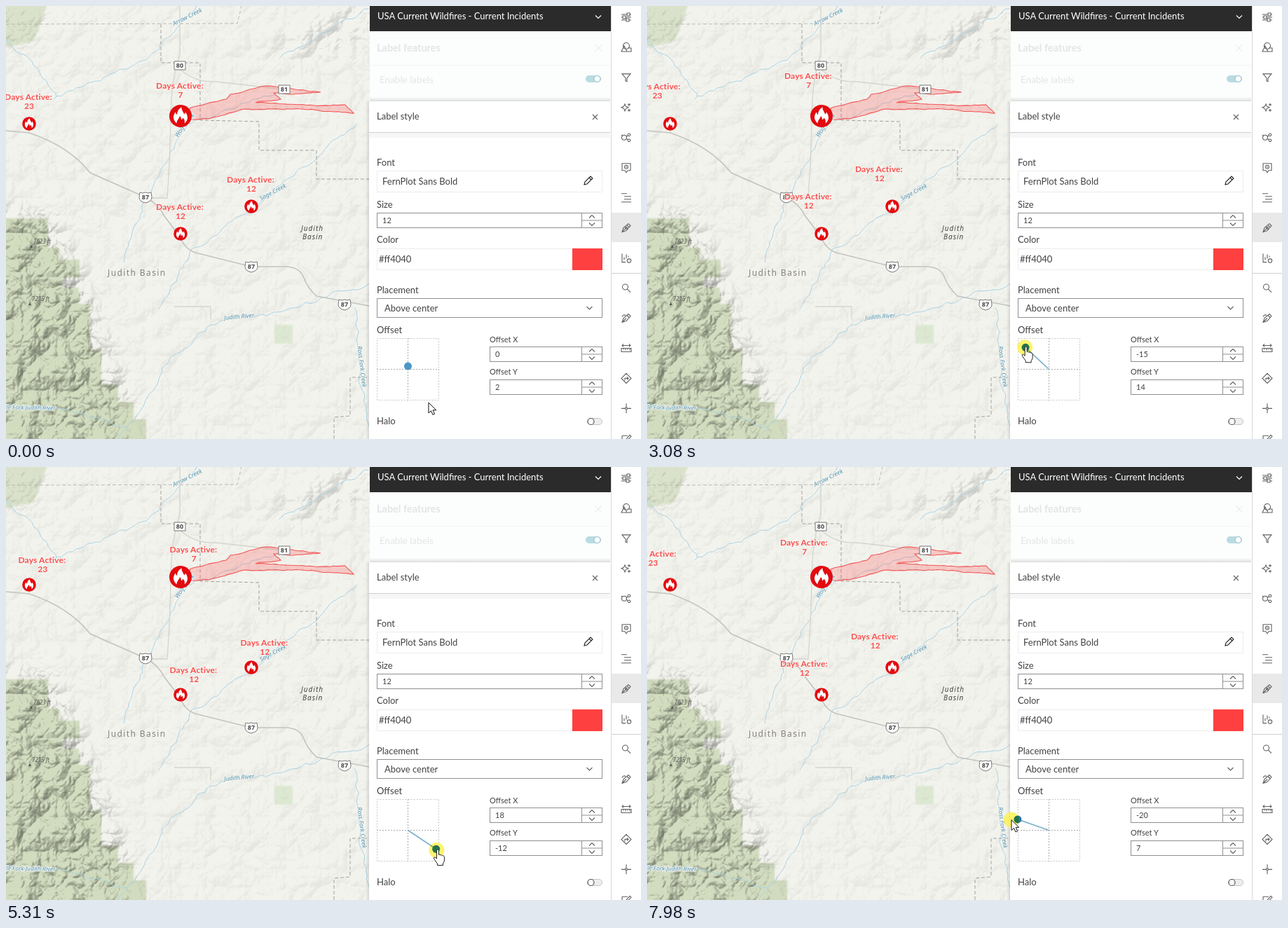
Write an HTML page that moves like this. It is 906x618 px and loops after 8000 ms.

```html
<!DOCTYPE html>
<html lang="en">
<head>
<meta charset="utf-8">
<title>Label offset</title>
<style>
html, body { margin: 0; width: 100%; height: 100%; overflow: hidden; background: #fff; }
svg { position: absolute; left: 0; top: 0; width: 906px; height: 618px; display: block; }
#map { will-change: transform; }
.ui text { font: 13px Lato, sans-serif; fill: #424242; }
.ui .small { font-size: 11px; }
.ui .head { fill: #fff; }
.ui .dim { fill: #e3e6e6; font-size: 13.5px; }
.ui .bold { font-weight: bold; font-size: 14.5px; }
.place { font-family: "Noto Sans", sans-serif; }
.water { font: italic 8.5px "Noto Sans", sans-serif; fill: #4f94b3; text-anchor: middle; stroke: #f3f3ee; stroke-width: 2px; paint-order: stroke; }
.road { font: bold 9px "Noto Sans", sans-serif; fill: #444; text-anchor: middle; }
.days text { font: bold 12px Lato, sans-serif; letter-spacing: .15px; fill: #f9504f; text-anchor: middle; stroke: #f6f3ee; stroke-width: 1.5px; paint-order: stroke; }
.line, .icons { fill: none; stroke: #606060; stroke-width: 1.1; }
.box { fill: #fff; stroke: #8f8f8f; }
.pale { fill: #fff; stroke: #ececec; }
</style>
</head>
<body>
<svg id="map" viewBox="0 0 906 618">
  <defs>
    <filter id="relief" x="0" y="0" width="100%" height="100%" color-interpolation-filters="sRGB">
      <feTurbulence type="turbulence" baseFrequency=".02" numOctaves="4" seed="8"/>
      <feDiffuseLighting surfaceScale="14" diffuseConstant="1.2" lighting-color="#fff">
        <feDistantLight azimuth="225" elevation="58"/>
      </feDiffuseLighting>
    </filter>
    <filter id="soft"><feGaussianBlur stdDeviation="14"/></filter>
    <filter id="edge"><feGaussianBlur stdDeviation="1.2"/></filter>
    <mask id="hills">
      <rect width="520" height="618" fill="#0d0d0d"/>
      <path d="M-40 290L60 300 110 400 160 540 185 640H-40Z" fill="#6c6c6c" filter="url(#soft)"/>
      <path d="M-30-30H70L30 50-30 70ZM370 60L520-20V50L430 80Z" fill="#2c2c2c" filter="url(#soft)"/>
    </mask>
  </defs>
  <rect width="520" height="618" fill="#f3f3ee"/>
  <g fill="#d2dcbf" filter="url(#edge)">
    <path d="M-5 303H60V345H76V362H105V388H80V402H104V425H120V490H136V540H160V565H182V590H200V623H-5Z"/>
    <path d="M-5-5H60L40 50-5 60Z" opacity=".75"/>
    <path d="M383 455H409V482H383Z" fill="#dde8d2"/>
  </g>
  <g mask="url(#hills)" style="mix-blend-mode:multiply"><rect width="520" height="618" filter="url(#relief)"/></g>
  <g fill="none" stroke="#a9d3e2" stroke-linejoin="round" id="rivers"></g>
  <g fill="none" stroke="#989895" stroke-dasharray="5 3" stroke-width=".9">
    <path d="M0 26L330 25 336 0" opacity=".7"/>
    <path d="M221 26V81H277V163L361 165V206H443V247H518M468 618V587L491 585V530H518"/>
  </g>
  <path d="M248 0V70Q236 100 235 160T230 274H199M33 181V160M240 429H292V447M248 90Q270 110 300 108L397 119" fill="none" stroke="#d4d4cf" stroke-width="1.3"/>
  <path d="M0 178L33 181Q90 200 120 238L199 273Q218 283 226 300L248 329Q255 347 270 352L350 372H402Q420 374 425 388T443 414L518 428" fill="none" stroke="#c4c4c0" stroke-width="1.7"/>
  <path id="burn" fill="#ff4848" fill-opacity=".24" stroke="#f25757" stroke-width="1.1"/>
  <g id="names"></g>
  <g id="fires"></g>
</svg>

<svg viewBox="0 0 906 618"><g class="days" id="days"></g></svg>

<svg class="ui" viewBox="0 0 906 618">
  <defs>
    <linearGradient id="left" x1="1" x2="0"><stop stop-opacity=".13"/><stop offset="1" stop-opacity="0"/></linearGradient>
    <linearGradient id="up" x1="0" x2="0" y1="1" y2="0"><stop stop-opacity=".13"/><stop offset="1" stop-opacity="0"/></linearGradient>
  </defs>
  <rect x="513" y="136" width="6" height="482" fill="url(#left)"/>
  <rect x="519" width="387" height="618" fill="#fff"/>
  <rect x="519" y="36" width="344" height="100" fill="#fcfdfd"/>
  <rect x="519" width="344" height="36" fill="#2b2b2b"/>
  <path d="M519 84.500H862" stroke="#f3f4f4"/>
  <path d="M840 55L850 65M850 55L840 65" stroke="#e6e6e6"/>
  <rect x="827" y="99" width="22" height="10" rx="5" fill="#b9dbe2"/>
  <circle cx="843.500" cy="104" r="4.500" fill="#fff" stroke="#8fbcc6"/>
  <rect x="519" y="130" width="343" height="6" fill="url(#up)"/>
  <rect x="518" y="136" width="344" height="482" fill="#fff"/>
  <path d="M518 180.500H862" stroke="#cfcfcf"/>
  <rect x="518" y="181" width="344" height="7" fill="#f6f6f6"/>
  <path class="line" d="M837 155L844 162M844 155L837 162"/>
  <path d="M841 13.500L845 17.500 849 13.500" fill="none" stroke="#fff" stroke-width="1.2"/>
  <path class="pale" d="M529.500 235.500H850.500V265.500H529.500ZM529.500 346.500H808V376.500H529.500Z"/>
  <path class="line" d="M825 255L826 251 834 243 837 246 829 254ZM832 245L835 248" style="stroke:#222"/>
  <rect x="808" y="346" width="43" height="31" fill="#ff4040"/>
  <rect class="box" x="529.500" y="417.500" width="321" height="27"/>
  <path class="line" d="M828.500 429L832.500 433 836.500 429"/>
  <g id="steppers"></g>
  <g fill="none" stroke="#c4c4c4" stroke-dasharray="2 2">
    <rect x="529.500" y="474.500" width="88" height="88"/>
    <path d="M573.500 474V563M529 518.500H618" stroke="#aaa"/>
  </g>
  <rect x="829.500" y="588.500" width="21" height="9" rx="4.500" fill="#eee" stroke="#c4c4c4"/>
  <circle cx="834.500" cy="593" r="4.500" fill="#fff" stroke="#555" stroke-width="1.2"/>
  <text class="head" x="530" y="19">USA Current Wildfires - Current Incidents</text>
  <g class="labels">
    <text class="dim bold" x="529" y="65">Label features</text>
    <text class="dim" x="533" y="110">Enable labels</text>
    <text x="529" y="162">Label style</text>
    <text x="529" y="228">Font</text>
    <text x="537" y="254.500">FernPlot Sans Bold</text>
    <text x="529" y="287.500">Size</text>
    <text x="537" y="309.500" class="small">12</text>
    <text x="529" y="337.500">Color</text>
    <text x="532" y="365.500">#ff4040</text>
    <text x="529" y="409.500">Placement</text>
    <text x="540" y="435.500">Above center</text>
    <text x="529" y="466.500">Offset</text>
    <text x="690" y="479.500" class="small">Offset X</text>
    <text x="690" y="525.500" class="small">Offset Y</text>
    <text x="529" y="597">Halo</text>
  </g>
  <text class="small" id="valX" x="698" y="501"></text>
  <text class="small" id="valY" x="698" y="547.500"></text>
  <path d="M863.500 0V618" stroke="#d9d9d9"/>
  <rect x="864" y="295" width="42" height="42" fill="#e9e9e9"/>
  <path d="M864 381.500H906" stroke="#cfcfcf"/>
  <g class="icons" id="tools"></g>
</svg>

<svg viewBox="0 0 906 618" style="isolation:isolate">
  <path id="arm" stroke="#7fb1cd" stroke-width="1.700"/>
  <circle id="dot" r="5.500"/>
  <circle id="glow" r="11" fill="#fdf048" opacity=".8" style="mix-blend-mode:multiply"/>
  <path id="arrow" d="M0 0V15L3.500 11.700 6 17.300 8.600 16.200 6.200 10.800H10.800Z" fill="#fff" stroke="#111"/>
  <path id="hand" d="M0-.5Q1.700-2 3 0V6.500Q4.500 5.200 5.700 7 7.300 5.900 8.300 7.800 10.300 7.100 11 9.500V14Q11 17 9 19V21.500H1V19L-3.600 12.500Q-4.800 10-2.600 9.800L0 12Z" fill="#fff" stroke="#222"/>
</svg>

<script>
const $ = id => document.getElementById(id);
const fill = (id, list, make) => { $(id).innerHTML = list.map(make).join(''); };

// A line through a few points, roughened sideways by a seeded random walk.
const rough = (points, amp) => {
  const p = points.split(' ').map(s => s.split(',').map(Number));
  let seed = p[0][0] + 7, w = 0, d = 'M' + p[0];
  const rnd = () => (seed = (seed * 16807 + 11) % 2147483647) / 2147483647 - .5;
  p.slice(1).forEach(([u, v], i) => {
    const [x, y] = p[i], len = Math.hypot(u - x, v - y), n = Math.ceil(len / 6);
    for (let k = 1; k <= n; k++) {
      const q = k / n;
      w = k < n ? w * .6 + rnd() * amp : 0;
      d += `L${(x + (u - x) * q - (v - y) / len * w).toFixed(1)} ${(y + (v - y) * q + (u - x) / len * w).toFixed(1)}`;
    }
  });
  return d;
};

fill('rivers', [
  '68,133 200,77 272,0', '0,50 34,76 72,130', '390,121 258,168 202,270 168,366',
  '500,168 380,268 262,352 218,432', '518,396 382,437 292,455 232,508 160,620',
  '0,570 75,574 172,600', '497,430 508,548 518,600', '390,75 518,4'
], s => `<path d="${rough(s, 5)}"/>`);
$('burn').setAttribute('d', rough(
  '262,146 314,133 320,126 370,114 412,119 449,123 410,126 382,124 392,133 356,138 440,142 484,141 496,153 430,148 340,147 290,161 262,162', 1.5) + 'Z');

const water = [['Arrow Creek', 260, 18, -27], ['Wolf Creek', 257, 172, -52], ['Sage Creek', 382, 268, -28],
  ['Judith River', 333, 446, -5], ['Ross Fork Creek', 505, 515, 83], ['Middle Fork Judith River', 26, 576, 1]];
const waterName = ([s, x, y, turn]) =>
  `<text class="water" transform="translate(${x} ${y}) rotate(${turn})">${s}</text>`;
const shield = n => (x, y) => {
  const edge = n > 81 ? 'M-8-7Q-4-5 0-7 4-5 8-7L9 0Q9 6 0 8-9 6-9 0Z' : 'M-8-6H8V6H-8Z';
  return `<g transform="translate(${x} ${y})"><path d="${edge}" fill="#fff" stroke="#777"/><text class="road" y="3.300">${n}</text></g>`;
};
const highway = shield(87);
const peak = (s, x, y) => `<path d="M${x - 5} ${y + 6}l2-4 2 4z" fill="#555"/>
  <text class="place" font-style="italic" font-size="8" fill="#555" x="${x}" y="${y}">${s}</text>`;
$('names').innerHTML = water.map(waterName).join('') +
  shield(80)(248, 85) + shield(81)(397, 119) + highway(199, 273) + highway(350, 372) + highway(483, 426) +
  peak('7623 ft', 39, 339) + peak('7215 ft', 37, 421) +
  `<text class="place" font-size="12" letter-spacing="1.400" fill="#85827a" x="145" y="385">Judith Basin</text>
   <g class="place" font-style="italic" font-size="10" letter-spacing="1" fill="#444"><text x="421" y="321">Judith</text><text x="423" y="333">Basin</text></g>`;

const fires = [[249, 157, 16, 7], [33, 168, 9.8, 23], [249, 325, 9.8, 12], [350, 286, 9.8, 12]];
fill('fires', fires, ([x, y, r]) => `<g transform="translate(${x} ${y}) scale(${r / 10})">
  <circle r="10" fill="#e30b0f"/>
  <path d="M-3.500 6.500C-7.500 3-6.500-1-4.500-3.500Q-4.200-1.500-3-1.200C-3.200-4-1.500-6.500 1-8 .7-5 2.700-4 3.200-1.500Q4.200-2.200 4.300-3.500C7-.5 7 4 3.500 6.500 4.200 4 3 2.500 2 1.500 1.800 3 .8 3.200.5 3 .7 1.500 0 .5-.7 0-.8 2-3.300 3.500-3.500 6.500Z" fill="#fff"/></g>`);
fill('days', fires, ([x, y, r, n]) => {
  const top = y - 24.5 - r * .75;
  return `<text x="${x - 1}" y="${top}">Days Active:</text><text x="${x}" y="${top + 13}">${n}</text>`;
});

fill('steppers', [[529.5, 295.5], [690.5, 486.5], [690.5, 533.5]], ([x, y]) =>
  `<rect class="box" x="${x}" y="${y}" width="${850.5 - x}" height="21"/>
   <path d="M821.500 ${y}v21M821.500 ${y + 10.5}h29" stroke="#8f8f8f"/>
   <path class="line" d="M832 ${y + 7}l4-4 4 4M832 ${y + 14}l4 4 4-4"/>`);

// Toolbar icons stand at even steps.
const ring = (x, y, r) => `M${x - r} ${y}a${r} ${r} 0 1 0 ${2 * r} 0a${r} ${r} 0 1 0 ${-2 * r} 0`;
const pen = 'M-6 6L-4 0 3-6 6-3 0 4ZM-6 6L0 0M1-4L4-1';
fill('tools', [
  'M-7-4H1M5-4H7M-7 0H-5M-1 0H7M-7 4H0M4 4H7M1-6H5V-2H1ZM-5-2H-1V2H-5ZM0 2H4V6H0Z',
  ring(0, -2, 4.5) + 'M-7 6L-3-2 1 6ZM2 1H7V6H1',
  'M-6-5H6L1 1V6L-1 5V1Z',
  'M-2-5L-.5-1.500 3 0-.5 1.500-2 5-3.500 1.500-7 0-3.500-1.500ZM4-6V-2M2-4H6M4 2V6M2 4H6',
  ring(-3, 0, 3.5) + ring(4, -4, 1.8) + ring(4, 4, 1.8) + 'M0-1L2-3M0 1L2 3M-7-4L-5-2',
  'M-6-6H6V4H2L0 7-2 4H-6Z' + ring(0, -1, 2.5) + 'M0-2V0',
  'M-7-6H1M-3-2H7M-3 2H7M-7 6H7',
  pen + ring(0, 0, 1.3),
  'M-6-6V6H-1M-3 3V-1M0 1V-5M3-1V-3' + ring(4, 4, 2.7),
  ring(-1.5, -1.5, 4) + 'M1.500 1.500L6 6',
  pen + 'M-6-2Q-4-6-1-4',
  'M-7 0H7V5H-7ZM-4 0V2M-1 0V3M2 0V2M5 0V3M-6-4H6M-4-6L-6-4-4-2M4-6L6-4 4-2',
  'M0-7L7 0 0 7-7 0ZM-2 3V0H3M1-2L3 0 1 2',
  'M0-7V-2M0 2V7M-7 0H-2M2 0H7' + ring(0, 0, 1.5),
  'M-6-4H2M-6-4V6H6V1M-1 2L5-5 7-3 1 3Z'
], (d, i) => `<path transform="translate(885 ${16 + i * 42.95})" d="${d}"/>`);

// Strokes of the pointer: start, end, and the offset it eases to.
const home = [13.2, -21.3];
const strokes = [
  [30, 830, 0, -.5], [1920, 2770, -15.4, 14], [3300, 4200, 12.3, 15.5], [4600, 5350, 18.4, -13],
  [5900, 6150, 4.7, -24], [6150, 6700, -21, -23], [6700, 7680, -24, 6.7]];
const press = 1520, dragLag = 40, labelLag = 300;
const unit = 2.23, mid = [573.5, 518.5];

const pointer = t => strokes.reduce(([x, y], [from, to, u, v]) => {
  const q = Math.min(1, Math.max(0, (t - from) / (to - from))), e = q * q * (3 - 2 * q);
  return [x + (u - x) * e, y + (v - y) * e];
}, home);
const snap = v => Math.max(-20, Math.min(20, Math.round(v))) || 0;
const offset = (t, lag) => t < press + lag ? [0, 2] : pointer(t - lag).map(snap);
const place = ([x, y]) => [mid[0] + x * unit, mid[1] - y * unit];
const move = (id, [x, y]) => $(id).setAttribute('transform', `translate(${x} ${y})`);
const show = (id, on) => { $(id).style.display = on ? '' : 'none'; };

const draw = t => {
  const hot = pointer(t), value = offset(t, dragLag), dot = place(value);
  const down = t >= press, over = Math.hypot(hot[0] - value[0], hot[1] - value[1]) < 3;
  move('dot', dot);
  $('dot').setAttribute('fill', down ? '#2478ad' : '#4b96c5');
  $('arm').setAttribute('d', `M${mid}L${dot}`);
  $('valX').textContent = value[0];
  $('valY').textContent = value[1];
  ['glow', 'arrow', 'hand'].forEach(id => move(id, place(hot)));
  show('arm', down);
  show('glow', down);
  show('hand', over);
  show('arrow', !over);
  const [lx, ly] = offset(t, labelLag);
  move('days', [lx * 1.21, 2.4 - ly * 1.21 - 2.4]);
};

const start = performance.now();
const tick = () => {
  draw((performance.now() - start) % 8000);
  requestAnimationFrame(tick);
};
draw(0);
requestAnimationFrame(tick);
</script>
</body>
</html>
```
